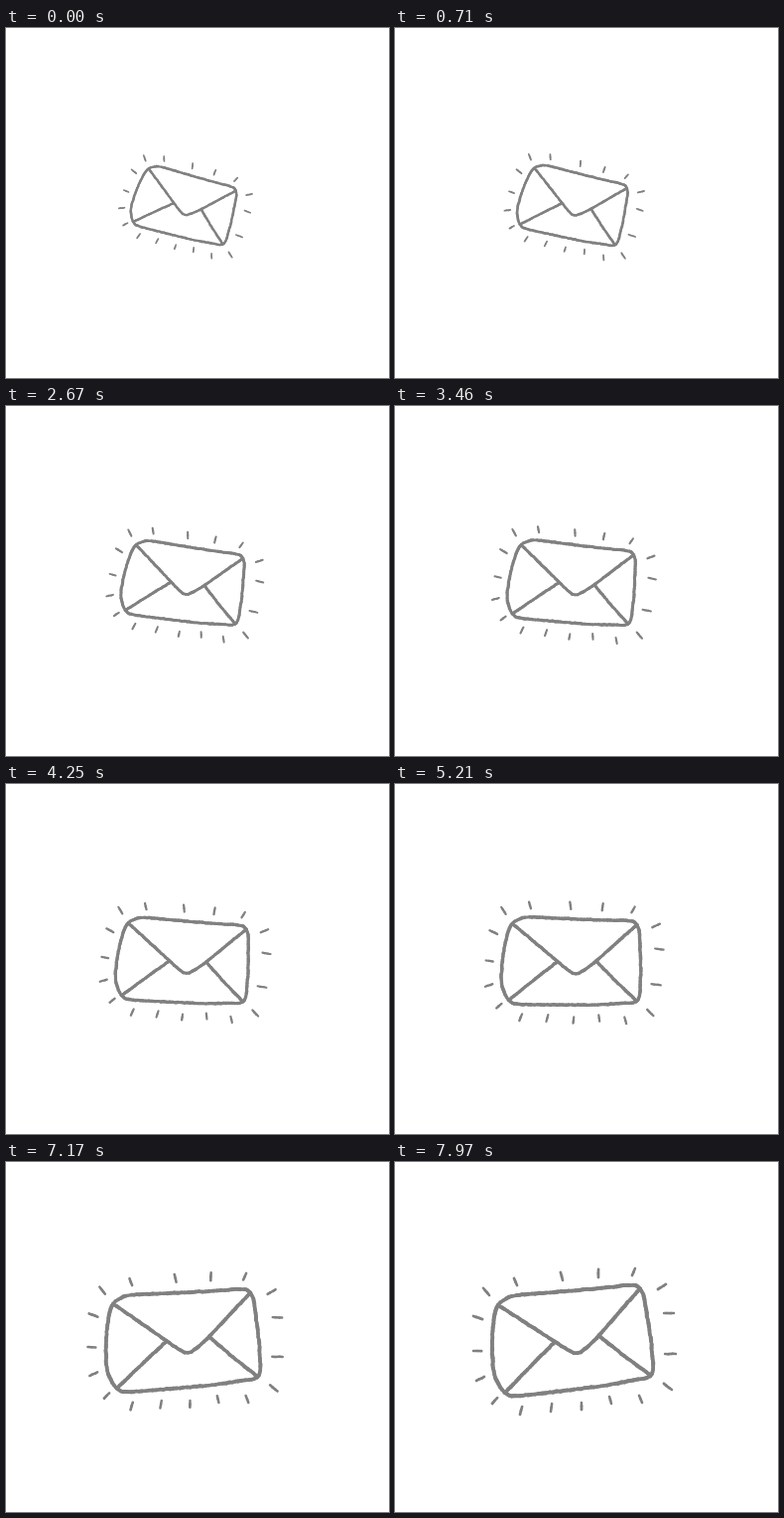
Recreate the animation shown at these times as an HTML page with a canvas. Size 386x352 px, loop 8 s.

```html
<!DOCTYPE html>
<html lang="en">
<head>
<meta charset="utf-8">
<title>Envelope</title>
<style>
  html, body { margin: 0; width: 100%; height: 100%; overflow: hidden; background: #fff; }
  canvas { display: block; }
</style>
</head>
<body>
<canvas id="stage" width="386" height="352"></canvas>
<script>
const ctx = document.getElementById('stage').getContext('2d');
const LOOP = 8000, FPS = 24, LAST = 191;
const CX = 181.2, CY = 180;
const START_SCALE = 0.63, START_ANGLE = 20.8 * Math.PI / 180;

// Pen strokes at full size, as x, y pairs
const outline = [104,144, 112,137.5, 123,134, 160,131, 200,127.5, 236,124, 245,125.5,
  250,133, 253.5,152, 258,180, 260,204, 259,213, 254,217, 240,219.5, 210,225,
  170,230, 126,235, 113,233.5, 104,223, 99.5,210, 98,190, 98.5,170, 100.5,153];
const folds = [
  [104,144, 132,162, 160,180, 176,190, 184,192, 191,188.5, 206,174, 227,150, 247,127],
  [111,232, 136,206, 161,181],
  [206,175, 231,195, 257,214]
];
const rays = [
  [89,127, 95,134], [120,117, 123,124], [167,111, 169,119], [205,108, 205,116],
  [242,107, 239,114], [273,123, 265,128], [271,152, 281,152], [272,193, 283,193],
  [271,223, 279,229], [246,235, 249,242], [216,236, 218,243], [188,242, 188,249],
  [158,243, 157,251], [128,246, 126,254], [103,237, 98,243], [90,216, 82,220],
  [87,190, 79,190], [88,158, 79,155]
];

let seed = 11;
function rand() {
  seed = (seed * 16807) % 2147483647;
  return seed / 2147483647;
}
const jitter = amount => (rand() * 2 - 1) * amount;

function blend(a, b, c, d, u) {
  return b + 0.5 * u * (c - a + u * (2 * a - 5 * b + 4 * c - d + u * (3 * (b - c) + d - a)));
}

// Catmull-Rom curve through the points, sampled every few pixels with a shaky hand
function sketch(coords, closed, width, shake) {
  const pts = [];
  for (let i = 0; i < coords.length; i += 2) pts.push([coords[i], coords[i + 1]]);
  const n = pts.length;
  const at = i => closed ? pts[(i + n) % n] : pts[Math.max(0, Math.min(n - 1, i))];
  const samples = [];
  for (let i = 0; i < (closed ? n : n - 1); i++) {
    const [a, b, c, d] = [at(i - 1), at(i), at(i + 1), at(i + 2)];
    const steps = Math.max(2, Math.round(Math.hypot(c[0] - b[0], c[1] - b[1]) / 3.5));
    for (let k = 0; k < steps; k++) {
      const u = k / steps;
      samples.push([0, 1].map(j => blend(a[j], b[j], c[j], d[j], u) + jitter(shake)));
    }
  }
  samples.push(closed ? samples[0] : pts[n - 1]);
  return samples.slice(1).map((p, i) => ({ from: samples[i], to: p, width: width + jitter(shake) }));
}

const strokes = [
  ...sketch(outline, true, 3.9, 0.3),
  ...folds.flatMap(f => sketch(f, false, 3.8, 0.3)),
  ...rays.flatMap(r => sketch(r, false, 2.7, 0.2))
];

function draw(time) {
  const frame = Math.min(LAST, Math.floor((time % LOOP + 4.9) * FPS / 1000));
  const p = frame / LAST;
  const scale = START_SCALE + (1 - START_SCALE) * p;

  ctx.setTransform(1, 0, 0, 1, 0, 0);
  ctx.fillStyle = '#fff';
  ctx.fillRect(0, 0, 386, 352);
  ctx.translate(CX, CY);
  ctx.rotate(START_ANGLE * (1 - p));
  ctx.scale(scale, scale);
  ctx.translate(-CX, -CY);

  ctx.strokeStyle = '#808080';
  ctx.lineCap = 'round';
  for (const s of strokes) {
    ctx.lineWidth = s.width;
    ctx.beginPath();
    ctx.moveTo(...s.from);
    ctx.lineTo(...s.to);
    ctx.stroke();
  }
}

const start = performance.now();
function tick() {
  draw(performance.now() - start);
  requestAnimationFrame(tick);
}
tick();
</script>
</body>
</html>
```
